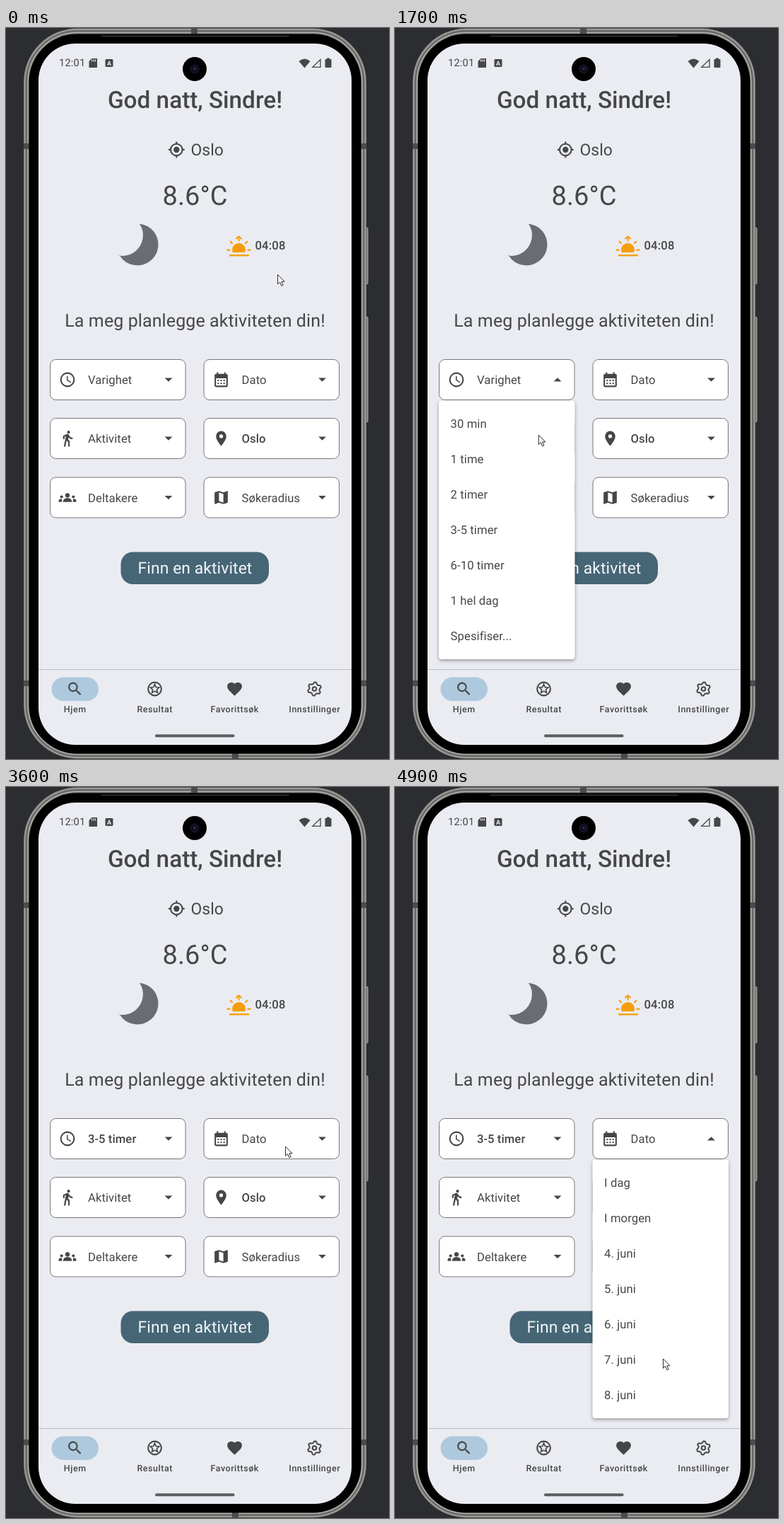
An HTML page with a canvas that plays this animation: 542x1033 px, repeating every 5000 ms.

```html
<!DOCTYPE html>
<html lang="no">
<head>
<meta charset="utf-8">
<title>Aktivitetsplanlegger</title>
<style>
  html, body { margin: 0; width: 100%; height: 100%; overflow: hidden; background: #2c2d31; }
  canvas { display: block; width: 542px; height: 1033px; }
</style>
</head>
<body>
<canvas id="stage" width="542" height="1033"></canvas>
<script>
const ctx = document.getElementById('stage').getContext('2d');
const LOOP = 5000, STEP = 100;
const INK = '#454648', BG = '#ebecf2', ORANGE = '#f79d0c';

// Icons on a 24 unit grid
const ICONS = {
  hands: 'M12.5 7H11v6l5.25 3.15.75-1.23-4.5-2.67z',
  calendar: 'M19 4h-1V2h-2v2H8V2H6v2H5a2 2 0 0 0-2 2v14a2 2 0 0 0 2 2h14a2 2 0 0 0 2-2V6a2 2 0 0 0-2-2zm0 16H5V10h14z',
  walk: 'M13.5 5.5a2 2 0 1 0 0-4 2 2 0 0 0 0 4zM9.8 8.9L7 23h2.1l1.8-8 2.1 2v6h2v-7.5l-2.1-2 .6-3C14.8 12 16.8 13 19 13v-2c-1.9 0-3.5-1-4.3-2.4l-1-1.6c-.4-.6-1-1-1.7-1-.3 0-.5.1-.8.1L6 8.3V13h2V9.6z',
  pin: 'M12 2a7 7 0 0 0-7 7c0 5.25 7 13 7 13s7-7.75 7-13a7 7 0 0 0-7-7zm0 9.5a2.5 2.5 0 1 1 0-5 2.5 2.5 0 0 1 0 5z',
  map: 'M20.5 3L15 5.1 9 3 3.4 4.9Q3 5 3 5.4V20.5q0 .5.5.5L9 18.9l6 2.1 5.6-1.9q.4-.1.4-.5V3.5q0-.5-.5-.5zM15 19l-6-2.1V5l6 2.1z',
  search: 'M15.5 14h-.8l-.3-.3A6.5 6.5 0 1 0 13.7 14.4l.3.3v.8l5 5L20.5 19zm-6 0a4.5 4.5 0 1 1 0-9 4.5 4.5 0 0 1 0 9z',
  heart: 'M12 21.35l-1.45-1.32C5.4 15.36 2 12.28 2 8.5A5.5 5.5 0 0 1 7.5 3C9.24 3 10.9 3.8 12 5.1 13.1 3.8 14.76 3 16.5 3A5.5 5.5 0 0 1 22 8.5c0 3.78-3.4 6.86-8.55 11.54z',
  arrow: 'M0 0V13.4L3.1 10.6 5.4 15.8 7.6 14.8 5.4 9.8H9.6z'
};
for (const k in ICONS) ICONS[k] = new Path2D(ICONS[k]);

function text(s, x, y, size, o = {}) {
  ctx.font = `${o.weight || 400} ${size}px Roboto, sans-serif`;
  ctx.letterSpacing = (o.gap === undefined ? 0.08 : o.gap) + 'px';
  ctx.textAlign = o.align || 'left';
  ctx.fillStyle = o.color || INK;
  ctx.fillText(s, x, y);
}

function rr(x, y, w, h, r, fill, stroke, lw = 1) {
  ctx.beginPath();
  ctx.roundRect(x, y, w, h, r);
  if (fill) { ctx.fillStyle = fill; ctx.fill(); }
  if (stroke) { ctx.strokeStyle = stroke; ctx.lineWidth = lw; ctx.stroke(); }
}

function disc(x, y, r, fill) {
  ctx.beginPath();
  ctx.arc(x, y, r, 0, 7);
  ctx.fillStyle = fill;
  ctx.fill();
}

function ring(x, y, r, lw, color = INK) {
  ctx.beginPath();
  ctx.arc(x, y, r, 0, 7);
  ctx.lineWidth = lw;
  ctx.strokeStyle = color;
  ctx.stroke();
}

function poly(pts, fill) {
  ctx.beginPath();
  pts.forEach(([x, y]) => ctx.lineTo(x, y));
  ctx.closePath();
  if (fill) { ctx.fillStyle = fill; ctx.fill(); }
}

function line(x1, y1, x2, y2, lw, color = INK) {
  ctx.beginPath();
  ctx.moveTo(x1, y1);
  ctx.lineTo(x2, y2);
  ctx.lineWidth = lw;
  ctx.strokeStyle = color;
  ctx.stroke();
}

// Runs draw() in a 24 unit box centred on x, y
function boxed(x, y, draw) {
  ctx.save();
  ctx.translate(x, y);
  ctx.scale(1.04, 1.04);
  ctx.translate(-12, -12);
  ctx.fillStyle = INK;
  draw();
  ctx.restore();
}
const icon = name => () => ctx.fill(ICONS[name], 'evenodd');

function polar(n, radius, turn = -Math.PI / 2) {
  return Array.from({ length: n }, (_, i) => {
    const a = turn + i * 2 * Math.PI / n, r = radius(i);
    return [12 + r * Math.cos(a), 12 + r * Math.sin(a)];
  });
}

const clock = () => { ring(12, 12, 9, 2); icon('hands')(); };
const calendar = () => {
  icon('calendar')();
  for (const x of [7, 11, 15]) for (const y of [12, 16]) ctx.fillRect(x, y, 2, 2);
};
const groups = () => {
  disc(12, 9, 3, INK);
  rr(6, 12.75, 12, 5.25, [5, 5, 0, 0], INK);
  for (const x of [4, 20]) disc(x, 11, 2, INK);
  rr(0, 14, 4.5, 4, [3, 1, 0, 0], INK);
  rr(19.5, 14, 4.5, 4, [1, 3, 0, 0], INK);
};
const star = () => {
  ring(12, 12, 9, 2);
  poly(polar(10, i => i % 2 ? 3 : 6.4));
  ctx.lineWidth = 1.6;
  ctx.stroke();
};
const gear = () => {
  poly(polar(24, i => (i + 1) % 4 < 2 ? 7 : 9.2, -Math.PI / 2 - Math.PI / 8 + Math.PI / 24));
  ctx.lineWidth = 1.9;
  ctx.strokeStyle = INK;
  ctx.lineJoin = 'round';
  ctx.stroke();
  ring(12, 12, 2.7, 1.9);
};
const target = () => {
  ring(12, 12, 8, 2);
  disc(12, 12, 4, INK);
  for (const [dx, dy] of [[1, 0], [-1, 0], [0, 1], [0, -1]])
    line(12 + dx * 8, 12 + dy * 8, 12 + dx * 11, 12 + dy * 11, 2);
};

function phone() {
  ctx.fillStyle = '#2c2d31';
  ctx.fillRect(0, 0, 542, 1033);
  for (const [y, h] of [[282, 80], [408, 149]]) rr(507, y, 5, h, 2, '#77777a', '#b4b4b1');
  rr(25, 0.5, 485, 1032, 76, '#6a6a68');
  rr(26.5, 2, 482, 1029, 75, null, '#9b9b98', 2);
  rr(31, 6.5, 473, 1020, 70, null, '#b3b3af', 1.5);
  ctx.fillStyle = '#4c4c4c';
  for (const y of [163, 922]) {
    ctx.fillRect(25, y, 8, 8);
    ctx.fillRect(502, y, 8, 8);
  }
  ctx.fillRect(262, 0, 9, 9);
  ctx.fillRect(320, 1025, 9, 8);
  rr(32.5, 8.5, 470, 1017, 68, '#000');
  rr(134, 10.5, 267, 2, 1, '#2b2b2c');
  rr(46, 22, 443, 991, 52, BG);
  disc(267, 58, 17, '#000');
  disc(267, 58, 7, '#0c0c18');
  ring(267, 58, 5, 1, '#1b1b33');
  disc(267, 57.5, 2, '#2c2c55');
}

function statusBar() {
  text('12:01', 75, 54.3, 14.6, { gap: 0.2 });
  poly([[121.5, 43], [129, 43], [129, 56], [117.5, 56], [117.5, 47]], INK);
  ctx.fillStyle = BG;
  for (const x of [121, 123.4, 125.8]) ctx.fillRect(x, 44.5, 1.2, 3);
  rr(140.5, 44, 11, 11, 1.5, INK);
  text('A', 146, 53, 9, { weight: 700, align: 'center', color: BG, gap: 0 });
  ctx.beginPath();
  ctx.moveTo(422.5, 56.5);
  ctx.lineTo(414.5, 47);
  ctx.quadraticCurveTo(422.5, 40, 430.5, 47);
  ctx.fillStyle = INK;
  ctx.fill();
  poly([[445, 44.5], [445, 55.4], [433.8, 55.4]]);
  ctx.lineWidth = 1.3;
  ctx.strokeStyle = INK;
  ctx.lineJoin = 'miter';
  ctx.stroke();
  rr(451.5, 44, 9, 12, 1, INK);
  ctx.fillRect(454, 42.5, 4, 2);
}

function weather() {
  text('God natt, Sindre!', 267.5, 112.7, 33.3, { weight: 500, align: 'center', gap: 0 });
  boxed(241.3, 172, target);
  text('Oslo', 261.5, 179.7, 22.9);
  text('8.6°C', 267.5, 250, 38, { align: 'center' });

  ctx.beginPath();
  ctx.arc(186, 306, 29.5, -1.47, 2.618);
  ctx.arc(165, 293, 28.9, 1.747, -0.616, true);
  ctx.fillStyle = '#696d73';
  ctx.fill();

  ctx.beginPath();
  ctx.arc(329.5, 313.5, 9.5, 2.75, 0.39);
  ctx.closePath();
  ctx.fillStyle = ORANGE;
  ctx.fill();
  line(316, 321.3, 344, 321.3, 2.4, ORANGE);
  for (const s of [-1, 1]) {
    line(329.5 + s * 12, 313.7, 329.5 + s * 17, 313.7, 2.2, ORANGE);
    line(329.5 + s * 9, 304.8, 329.5 + s * 12.3, 301.3, 2.2, ORANGE);
    line(329.5, 294.3, 329.5 + s * 4, 298.3, 2, ORANGE);
  }
  line(329.5, 294.5, 329.5, 301.5, 2, ORANGE);
  text('04:08', 352.4, 313.2, 16.65, { weight: 500, gap: 0.2 });

  text('La meg planlegge aktiviteten din!', 267.5, 421.8, 25, { align: 'center', gap: 0.1 });
}

function field(x, y, draw, label, bold, open) {
  rr(x + 0.5, y + 0.5, 191.5, 57, 8, '#fff', '#77787b');
  boxed(x + 25, y + 29, draw);
  text(label, x + 54, y + 35, 16.65, { weight: bold ? 500 : 400 });
  const cx = x + 168, cy = y + 29, d = open ? -1 : 1;
  poly([[cx - 5.4, cy - 2.6 * d], [cx + 5.4, cy - 2.6 * d], [cx, cy + 2.8 * d]], INK);
}

function fields(chosen, leftOpen, rightOpen) {
  field(62, 468, clock, chosen ? '3-5 timer' : 'Varighet', chosen, leftOpen);
  field(279.5, 468, calendar, 'Dato', false, rightOpen);
  field(62, 551, icon('walk'), 'Aktivitet');
  field(279.5, 551, icon('pin'), 'Oslo', true);
  field(62, 634.5, groups, 'Deltakere');
  field(279.5, 634.5, icon('map'), 'Søkeradius');
  rr(162.5, 740.5, 209.5, 45.5, 17, '#466676');
  text('Finn en aktivitet', 267.5, 771, 22.9, { align: 'center', color: '#f3f6fa' });
}

function navBar() {
  line(46, 906.5, 489, 906.5, 1, '#bdbec4');
  rr(64.5, 917.5, 66.5, 33.5, 16.7, '#aec9dd');
  const tabs = [['Hjem', icon('search')], ['Resultat', star], ['Favorittsøk', icon('heart')], ['Innstillinger', gear]];
  tabs.forEach(([label, draw], i) => {
    const x = 97.5 + i * 113;
    boxed(x, 934, draw);
    text(label, x + 0.2, 967.4, 12.5, { weight: 500, align: 'center', gap: 0.52 });
  });
  rr(211, 998.3, 112.5, 4, 2, '#5c5e60');
}

function menu(x, items, show) {
  if (!show) return;
  const scale = 0.85 + 0.15 * show;
  ctx.save();
  ctx.globalAlpha = show;
  ctx.translate(x + 96, 526.5);
  ctx.scale(scale, scale);
  ctx.translate(-x - 96, -526.5);
  ctx.save();
  ctx.shadowColor = 'rgba(0,0,0,.36)';
  ctx.shadowBlur = 5;
  ctx.shadowOffsetY = 2;
  rr(x, 526.5, 192.5, 365.5, 4, '#fff');
  ctx.restore();
  items.forEach((s, i) => text(s, x + 16.6, 565 + i * 50, 16.65));
  ctx.restore();
}

const HOURS = ['30 min', '1 time', '2 timer', '3-5 timer', '6-10 timer', '1 hel dag', 'Spesifiser...'];
const DAYS = ['I dag', 'I morgen', ...[4, 5, 6, 7, 8].map(d => d + '. juni')];

// Pointer moves: start, end, target x, target y
const MOVES = [
  [0, 600, 214.5, 506.3],
  [1100, 1400, 211, 535],
  [1500, 2100, 181, 690],
  [2100, 2400, 177.5, 698.5],
  [2900, 3400, 369.5, 521.5],
  [3400, 3600, 395.5, 508],
  [4500, 4900, 379.5, 808]
];

function pointer(t) {
  let x = 384.5, y = 348.5;
  for (const [a, b, tx, ty] of MOVES) {
    const p = Math.min(1, Math.max(0, (t - a) / (b - a)));
    const e = p * p * (3 - 2 * p);
    x += (tx - x) * e;
    y += (ty - y) * e;
  }
  ctx.save();
  ctx.translate(x, y);
  ctx.fillStyle = '#fff';
  ctx.fill(ICONS.arrow);
  ctx.lineWidth = 1;
  ctx.lineJoin = 'miter';
  ctx.strokeStyle = '#2a2a2c';
  ctx.stroke(ICONS.arrow);
  ctx.restore();
}

function fade(t, from, to) {
  if (t < from || t > to) return 0;
  return t === from || t === to ? 0.55 : 1;
}

function draw(t) {
  const left = fade(t, 800, 2900), right = fade(t, 3900, LOOP);
  ctx.textRendering = 'geometricPrecision';
  phone();
  statusBar();
  weather();
  fields(t >= 2900, left === 1 || t === 800, right > 0);
  navBar();
  menu(62, HOURS, left);
  menu(279.5, DAYS, right);
  pointer(t);
}

let start;
function tick(now) {
  if (start === undefined) start = now;
  const t = (now - start) % LOOP;
  draw(Math.floor(t / STEP) * STEP);
  requestAnimationFrame(tick);
}
requestAnimationFrame(tick);
</script>
</body>
</html>
```
